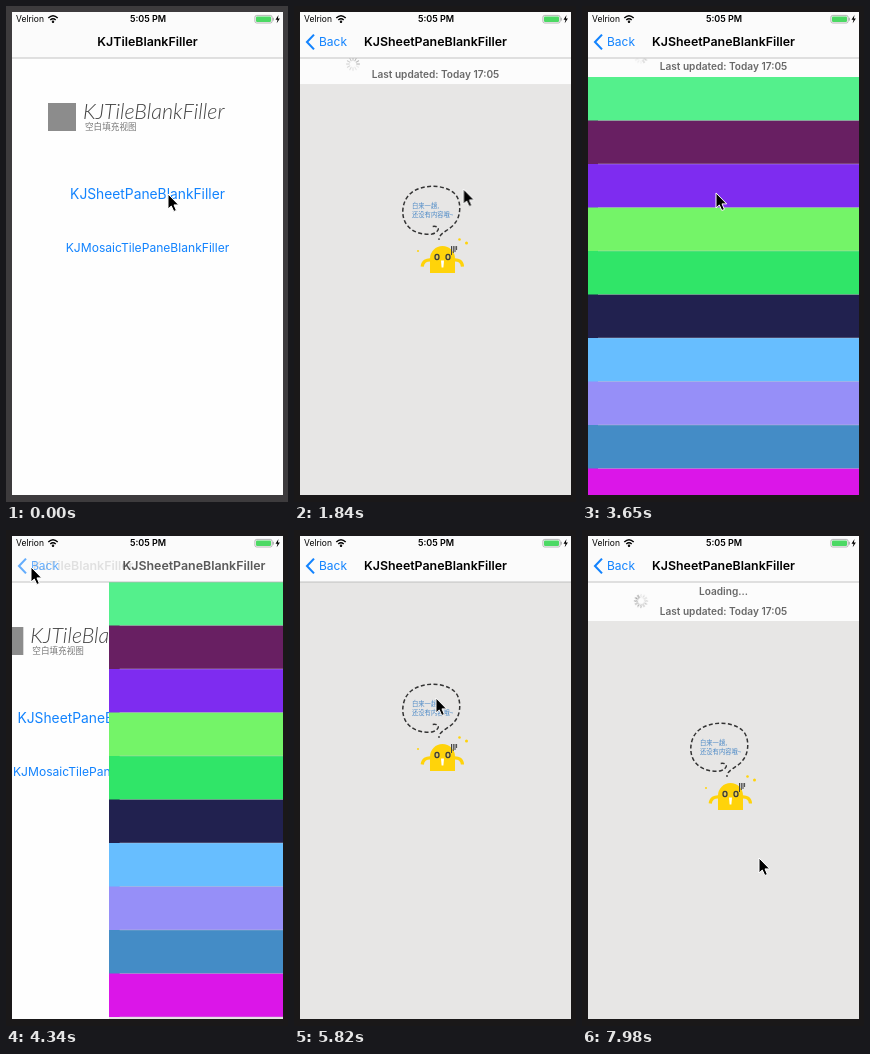
Recreate the animation shown at these times as an HTML page. Size 282x496 px, loop 8 s.

```html
<!DOCTYPE html>
<html lang="en">
<head>
<meta charset="utf-8">
<title>Empty list demo</title>
<style>
@property --push { syntax: "<number>"; inherits: true; initial-value: 0; }
@property --pull { syntax: "<number>"; inherits: true; initial-value: 0; }

html, body { margin: 0; width: 100%; height: 100%; overflow: hidden; background: #1a1819; }
svg {
  display: block; width: 282px; height: 496px;
  font-family: Inter, "Noto Sans CJK SC", "Noto Sans CJK", sans-serif;
  animation: push 8s linear infinite, pull 8s linear infinite;
}
.mid { text-anchor: middle; }
.title { font-size: 12.4px; font-weight: 600; }
.link { fill: #1283fe; }
.note { font-size: 10.1px; font-weight: 600; fill: #686868; text-anchor: middle; }
.cjk { font-family: "Noto Sans CJK SC", "Noto Sans CJK", sans-serif; }

.bezel { animation: focus 8s step-end infinite; }
.home { transform: translateX(calc(var(--push) * -82px)); }
.list { transform: translateX(calc((1 - var(--push)) * 273px)); }
.home-title { transform: translateX(calc(var(--push) * -100px)); opacity: calc(1 - var(--push) * 1.4); }
.list-title { transform: translateX(calc((1 - var(--push)) * 130px)); opacity: var(--push); }
.back { opacity: var(--push); }
.sheet { transform: translateY(calc(var(--pull) * 1px)); }
.spinner { opacity: calc(var(--pull) / 39); }
.spinner g { animation: spin 8s linear infinite; }
.ask { animation: ask 8s step-end infinite; }
.release { animation: release 8s step-end infinite; }
.loading { animation: loading 8s step-end infinite; }
.rows { animation: rows 8s step-end infinite; }
.press { animation: press 8s linear infinite; }
.cursor { animation: cursor 8s linear infinite; }

@keyframes focus { 0% { fill: #3d3b3d; } 5.6%, to { fill: #1a1819; } }
@keyframes push {
  0%, 7.5% { --push: 0; animation-timing-function: cubic-bezier(.25, .7, .25, 1); }
  14.4%, 53.6% { --push: 1; animation-timing-function: cubic-bezier(.25, .7, .25, 1); }
  59%, 63.5% { --push: 0; animation-timing-function: cubic-bezier(.25, .7, .25, 1); }
  69.6%, to { --push: 1; }
}
@keyframes pull {
  0%, 18.75% { --pull: 0; }
  23% { --pull: 26; }
  26%, 28.6% { --pull: 40; }
  30% { --pull: 39; }
  43.1% { --pull: 39; animation-timing-function: ease-in-out; }
  48.1%, 84% { --pull: 0; }
  84.375% { --pull: 3; }
  87.4%, 89.25% { --pull: 52; }
  93.1% { --pull: 115; animation-timing-function: ease-out; }
  97.5%, to { --pull: 39; }
}
@keyframes ask { 0% { opacity: 1; } 25.8% { opacity: 0; } 43.1% { opacity: 1; } 86.5%, to { opacity: 0; } }
@keyframes release { 0% { opacity: 0; } 25.8% { opacity: 1; } 28.6% { opacity: 0; } 86.5% { opacity: 1; } 93.1%, to { opacity: 0; } }
@keyframes loading { 0% { opacity: 0; } 28.6% { opacity: 1; } 43.1% { opacity: 0; } 93.1%, to { opacity: 1; } }
@keyframes rows { 0% { opacity: 0; } 43.1% { opacity: 1; } 61%, to { opacity: 0; } }
@keyframes spin {
  0% { transform: rotate(0); }
  28.6% { transform: rotate(0); animation-timing-function: steps(14); }
  43.1%, 93.1% { transform: rotate(420deg); animation-timing-function: steps(7); }
  to { transform: rotate(630deg); }
}
@keyframes press {
  0%, 5.6% { opacity: 1; } 5.7%, 7.5% { opacity: .25; } 9.5%, 62.4% { opacity: 1; }
  62.5%, 63.5% { opacity: .25; } 65.5%, to { opacity: 1; }
}
@keyframes cursor {
  0%, 8% { transform: translate(162px, 188px); }
  16% { transform: translate(168px, 150px); }
  18.75% { transform: translate(167px, 136px); }
  23% { transform: translate(169.5px, 183px); }
  26% { transform: translate(145px, 201px); }
  26.75%, 42% { transform: translate(142px, 200px); }
  45.625% { transform: translate(134px, 187px); }
  48.5% { transform: translate(124px, 168px); animation-timing-function: ease-in-out; }
  53%, 55.5% { transform: translate(25px, 37px); }
  61.125% { transform: translate(118px, 171px); }
  62.3%, 65% { transform: translate(126px, 184px); }
  72% { transform: translate(140px, 170px); }
  80% { transform: translate(160px, 148px); }
  83.5% { transform: translate(160px, 153px); }
  84.375% { transform: translate(159px, 159px); }
  87.4%, 89.25% { transform: translate(176px, 262px); }
  93.1% { transform: translate(188px, 478px); }
  95% { transform: translate(186px, 440px); }
  99% { transform: translate(176px, 339px); }
  99.7%, to { transform: translate(177px, 328px); }
}
</style>
</head>
<body>
<svg viewBox="0 0 282 496">
  <clipPath id="screen"><path d="M6 6h271v483H6z"/></clipPath>
  <rect class="bezel" width="282" height="496"/>
  <g clip-path="url(#screen)">
    <rect x="5" y="5" width="273" height="485" fill="#fefefe"/>

    <g class="home">
      <rect x="5" y="52" width="273" height="438" fill="#fefefe"/>
      <rect x="42" y="97" width="28" height="28" fill="#8c8c8c"/>
      <text x="77" y="113" font-family="Lato, sans-serif" font-size="21.5" font-weight="300" font-style="italic" fill="#444">KJTileBlankFiller</text>
      <text class="cjk" x="79" y="124" font-size="8.6" font-weight="500" fill="#777">空白填充视图</text>
      <text class="mid link press" x="141.5" y="193" font-size="13.8">KJSheetPaneBlankFiller</text>
      <text class="mid link" x="141.5" y="246" font-size="12.1">KJMosaicTilePaneBlankFiller</text>
    </g>

    <g class="list">
      <rect x="5" y="51" width="273" height="439" fill="#fcfcfc"/>
      <g class="sheet">
        <g class="note">
          <text class="ask" x="141.5" y="26">Pull down to refresh</text>
          <text class="release" x="141.5" y="26">Release to refresh</text>
          <text class="loading" x="141.5" y="26">Loading...</text>
          <text x="141.5" y="45.5">Last updated: Today 17:05</text>
        </g>
        <g class="spinner" transform="translate(59 32)"><g id="ticks" stroke="#555" stroke-width="1" stroke-linecap="round"></g></g>
        <rect x="5" y="52" width="273" height="440" fill="#e7e6e5"/>
        <path d="M146 204C148 200 157 197 161 191C167 184 168 168 160 161C150 152 128 152 117 161C108 168 106 184 113 193C119 201 130 203 138 202C146 200 147 193 138 194.5"
          fill="none" stroke="#333" stroke-width="1.5" stroke-dasharray="4 2.4"/>
        <circle cx="145" cy="207" r=".9" fill="#333"/>
        <g class="cjk" font-size="6.3" fill="#4a88c6">
          <text x="118" y="175.700">白来一趟,</text>
          <text x="118" y="184.500">还没有内容哦~</text>
        </g>
        <g fill="#ffd30a">
          <path d="M136 241V226.500A12.500 12.500 0 0 1 161 226.500V241Z"/>
          <path d="M138 228Q129 227 128.200 234.500M159 228Q168 227 168.500 234.500" fill="none" stroke="#ffd30a" stroke-width="3.200"/>
          <circle cx="165.500" cy="207.500" r="1.300"/>
          <circle cx="172.500" cy="211" r="1.500"/>
          <circle cx="124" cy="219" r="1"/>
        </g>
        <g fill="#e8cf5a" stroke="#3a3a3a" stroke-width="1.300">
          <ellipse cx="143" cy="225" rx="2" ry="2.600"/>
          <ellipse cx="154" cy="225" rx="2" ry="2.600"/>
        </g>
        <path d="M147 228.500h3l-.6 7h-1.800z" fill="#fff"/>
        <path d="M157.500 214v9M159.300 214v7M161 214v6M162.600 214v4" stroke="#444" stroke-width="1"/>
        <g class="rows" id="rows"></g>
      </g>
    </g>

    <rect x="5" y="5" width="273" height="47" fill="#fbfbfb"/>
    <rect x="5" y="51.6" width="273" height=".8" fill="#b4b4b4"/>
    <text x="10" y="16" font-size="8.500">Velrion</text>
    <text class="mid" x="142" y="16" font-size="9" font-weight="600">5:05 PM</text>
    <g fill="none" stroke="#000" stroke-width="1.500">
      <path d="M42.300 12Q47 7.500 51.700 12M44.300 14Q47 11.500 49.700 14"/>
      <circle cx="47" cy="15.700" r=".5"/>
    </g>
    <rect x="248.900" y="9.400" width="17.200" height="7.600" rx="1.800" fill="none" stroke="#999" stroke-width=".7"/>
    <rect x="250" y="10.500" width="15" height="5.400" rx=".8" fill="#4cd964"/>
    <path d="M267.200 11.800v2.800" stroke="#999"/>
    <path d="M272.500 9l-3 4.700h2l-.8 3.500 3.200-4.800h-2z"/>

    <text class="mid title home-title" x="141.500" y="40.300">KJTileBlankFiller</text>
    <text class="mid title list-title" x="141.500" y="40.300">KJSheetPaneBlankFiller</text>
    <g class="back">
      <path d="M20 28.600L13 36L20 43.400" fill="none" stroke="#1283fe" stroke-width="2.100"/>
      <text class="link" x="25" y="40" font-size="12">Back</text>
    </g>
  </g>
  <path class="cursor" d="M0 0V15L3.300 12L5.800 17.500L8.400 16.400L6 10.900H10.700Z" stroke="#fff"/>
</svg>
<script>
const add = (parent, name, attrs) => {
  const node = document.createElementNS(parent.namespaceURI, name);
  for (const key in attrs) node.setAttribute(key, attrs[key]);
  parent.append(node);
};

const ticks = document.getElementById("ticks");
for (let i = 0; i < 12; i++) {
  add(ticks, "path", { d: "M0-3.700V-6.500", transform: `rotate(${i * 30 + 120})`, opacity: 0.15 + i * 0.05 });
}

const rows = document.getElementById("rows");
const rowHeight = 43.5;
const colors = ["#54f08c", "#681f62", "#7e2cf0", "#74f468", "#30e568", "#21214f",
  "#67beff", "#968ff8", "#448cc6", "#db16e8", "#e7e6e5"];
colors.forEach((fill, i) => {
  const y = 52 + i * rowHeight;
  add(rows, "rect", { x: 5, y, width: 273, height: rowHeight + 0.5, fill });
  if (i) add(rows, "rect", { x: 16, y: y - 0.4, width: 262, height: 0.7, fill: "#c8c7cc", opacity: 0.6 });
});
</script>
</body>
</html>
```
